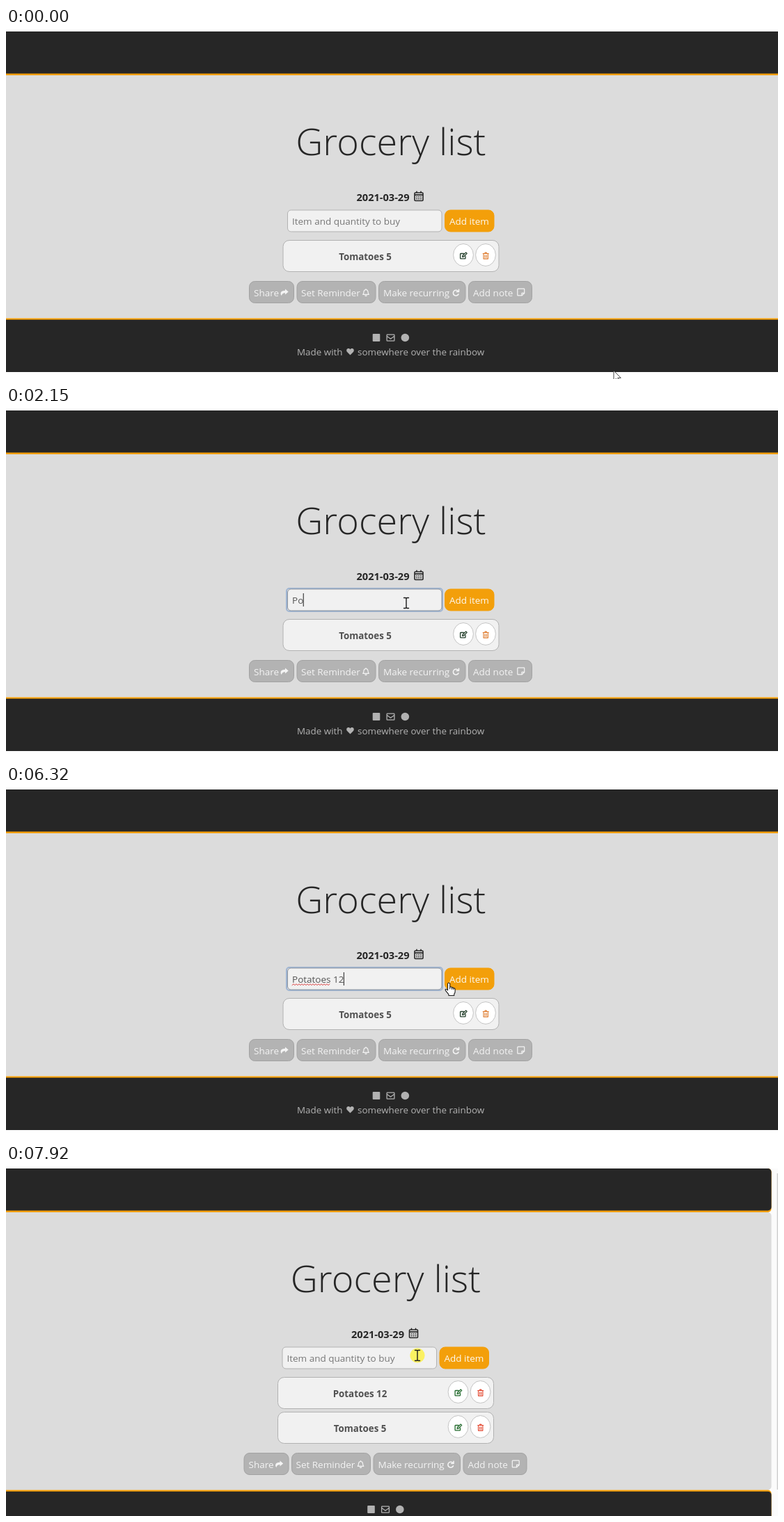
Animation, 1109 px wide and 505 px high, one loop 7.99 s. Source, as an HTML page:

```html
<!DOCTYPE html>
<html lang="en">
<head>
<meta charset="utf-8">
<title>Grocery list</title>
<style>
  html, body { margin: 0; width: 100%; height: 100%; overflow: hidden; background: #fff; }
  svg { display: block; width: 1109px; height: 505px; }
  text { font: 13.5px "Open Sans", "Noto Sans", sans-serif; white-space: pre; }
  .title { font-size: 54px; font-weight: 300; fill: #262626; }
  .date { font-size: 14.6px; font-weight: 700; fill: #262626; }
  .name { font-size: 13.3px; font-weight: 700; fill: #505050; }
  .foot { font-size: 13.4px; fill: #b2b2b2; }
  .line { fill: none; stroke-linecap: round; stroke-linejoin: round; }
</style>
</head>
<body>
<svg id="stage" viewBox="0 0 1109 505" xmlns="http://www.w3.org/2000/svg"></svg>
<script>
const LOOP = 7990, STEP = 70;
const FOCUS = 1030, BLUR = 6940, ADDED = 7080;
const ORANGE = [243, 159, 10], TAN = [227, 205, 165];

// [time, character]
const keys = [
  [1890, 'P'], [2020, 'o'], [2410, 't'], [2540, 'a'], [2940, 't'], [3470, 'o'],
  [3600, 'e'], [3860, 's'], [4720, ' '], [5190, '1'], [5320, '2']
];
// [time, x, y]
const path = [
  [0, 873, 493], [70, 858, 480], [210, 760, 428], [420, 585, 338], [560, 540, 290],
  [700, 575, 282], [6110, 575, 282], [6250, 619, 284], [6320, 643, 283],
  [6530, 653, 287], [6870, 658, 280], [7360, 658, 280], [7490, 646, 282],
  [7630, 618, 283], [7770, 596, 277], [7850, 591, 274], [LOOP, 591, 274]
];
const clicks = [[960, 1160], [6870, ADDED], [7920, LOOP]];

const box = (x, y, w, h, r, fill, stroke = 'none') =>
  `<rect x="${x}" y="${y}" width="${w}" height="${h}" rx="${r}" fill="${fill}" stroke="${stroke}"/>`;
const label = (x, y, s, attrs = '') => `<text x="${x}" y="${y}" ${attrs}>${s}</text>`;
const icon = (x, y, color, d, w = 1.2) =>
  `<path class="line" transform="translate(${x} ${y})" stroke="${color}" stroke-width="${w}" d="${d}"/>`;
const solid = (x, y, fill, d) => `<path transform="translate(${x} ${y})" fill="${fill}" d="${d}"/>`;

const PENCIL = 'M5.5 2H1.2Q.6 2 .6 2.6V8.8Q.6 9.4 1.2 9.4H7.4Q8 9.4 8 8.8V6M3.6 6.8L4 5 8.7.4 10.2 1.9 5.5 6.5Z';
const BIN = 'M.5 2H8.5M3 1.8L3.5.6H5.5L6 1.8M1.3 2.2V9.6H7.7V2.2M3.4 4.2V7.8M5.6 4.2V7.8';

const row = (id, y) => `<g id="${id}">
  ${box(398, y, 310, 45, 9, '#f1f1f1', '#b2b2b2')}
  ${label(516, y + 28, 'Tomatoes 5', 'class="name" text-anchor="middle"')}</g>`;
const tools = (id, y) => `<g id="${id}" fill="#fff" stroke="#c4c4c4">
  <ellipse cx="657" cy="${y}" rx="14.4" ry="16"/><ellipse cx="689" cy="${y}" rx="14.4" ry="16"/>
  ${icon(652, y - 4, 'var(--edit)', PENCIL, 1.3)}${icon(684.7, y - 4, 'var(--bin)', BIN, 1.1)}</g>`;
const action = (x, w, tx, s) =>
  box(x, 364.5, w, 31, 8, '#b3b3b3', '#a2a2a2') + label(tx, 386, s, 'fill="#f4f4f4"');

const stage = document.getElementById('stage');
stage.innerHTML = `
<defs><filter id="blur" x="-100%" y="-200%" width="300%" height="500%"><feGaussianBlur stdDeviation="14"/></filter></defs>
<g id="bar">${box(1099, 5, 10, 500, 0, '#fbfbfb')}${box(1107.5, 12, 1.5, 455, 0, '#cfcfcf')}</g>
<rect class="wide" x="-10" y="5" height="63" fill="#f39f0a"/>
<rect class="wide" x="-10" y="5" height="60.5" fill="#262626"/>
<rect class="wide" id="main" x="-10" y="68" fill="#dcdcdc"/>
<g id="base">
  <rect class="wide" x="-10" y="417.5" height="77.5" fill="#f39f0a"/>
  <rect class="wide" x="-10" y="419.7" height="75.3" fill="#262626"/>
</g>
<g id="page">
  ${label(553, 183, 'Grocery list', 'class="title" text-anchor="middle"')}
  ${label(503.5, 249, '2021-03-29', 'class="date"')}
  ${icon(586, 234.5, '#262626', 'M1 3.5Q1 2.5 2 2.5H12Q13 2.5 13 3.5V13Q13 14 12 14H2Q1 14 1 13ZM1 5.6H13M4 .7V2.5M10 .7V2.5', 1.6)}
  ${icon(586, 234.5, '#262626', 'M3.9 8.4H4.4M6.8 8.4H7.3M9.7 8.4H10.2M3.9 11.2H4.4M6.8 11.2H7.3M9.7 11.2H10.2', 1.5)}
  <g id="ring">${box(403, 261, 224, 33, 4, 'none', '#9fb5d2')}</g>
  <rect id="field" x="404.5" y="262" width="221.5" height="31" rx="5" fill="#f1f1f1"/>
  <text id="typed" x="411" y="283.3"></text>
  <path id="wave" class="line" stroke="#dc3030" stroke-width=".9"/>
  <rect id="caret" y="268" width="1.1" height="19" fill="#333"/>
  ${row('top', 305.5)}${row('extra', 355.5)}
  <rect id="shade" x="630" y="270" width="72" height="32" rx="8" filter="url(#blur)"/>
  <rect id="add" x="630.5" y="262" width="70.5" height="31" rx="8"/>
  ${label(637, 283.3, 'Add item', 'id="addText"')}
  ${tools('topTools', 326.5)}${tools('extraTools', 376.5)}
  <g id="low">
    ${action(349.5, 64, 356, 'Share')}${action(418, 113, 424, 'Set Reminder')}
    ${action(535.5, 124.5, 542, 'Make recurring')}${action(664.5, 91, 671, 'Add note')}
    ${solid(394, 375, '#f4f4f4', 'M7 .5L11.7 4.5 7 8.6V6.2Q2.6 6 1.9 10.2-.2 8 .8 5.4 2.1 2.8 7 2.8Z')}
    ${icon(512, 375, '#f4f4f4', 'M.7 8.3Q2 7 2 4.6 2.2 1.7 5 1.5 7.8 1.7 8 4.6 8 7 9.3 8.3ZM5 .5V1.3M3.9 10Q5 11 6.1 10')}
    ${icon(641, 375.5, '#f4f4f4', 'M8.8 3.6A4 4 0 1 0 9 7.4M9.5 .8V4H6.2', 1.6)}
    ${icon(734, 374.5, '#f4f4f4', 'M1.5.7H10Q10.7.7 10.7 1.4V7L7.2 10.4H1.5Q.8 10.4.8 9.7V1.4Q.8.7 1.5.7ZM10.4 6.8H7V10.2')}
    ${box(526.7, 440, 10.6, 11, 1, '#b2b2b2')}
    ${icon(546.5, 440.5, '#b2b2b2', 'M1.3.7H10.7Q11.4.7 11.4 1.4V9Q11.4 9.7 10.7 9.7H1.3Q.6 9.7.6 9V1.4Q.6.7 1.3.7ZM.8 3L6 6.8 11.2 3', 1.3)}
    <circle cx="573.3" cy="445.5" r="5.8" fill="#b2b2b2"/>
    ${label(418, 470.7, 'Made with', 'class="foot"')}
    ${solid(489, 460.5, '#b2b2b2', 'M5.5 10L1 5.4C-1 3 1-.4 3.6.6 4.7 1 5.1 1.6 5.5 2.1 5.9 1.6 6.3 1 7.4.6 10-.4 12 3 10 5.4Z')}
    ${label(505, 470.7, 'somewhere over the rainbow', 'class="foot"')}
  </g>
</g>
<circle id="glow" r="10.6" fill="#fff01e" fill-opacity=".68"/>
<g id="pointer">
  <path id="arrow" fill="#fff" stroke="#333" stroke-width=".9" d="M0 0V14.5L3.4 11.4 5.6 16.4 8 15.3 5.8 10.4H10.2Z"/>
  <path id="beam" class="line" stroke="#1c1c1c" stroke-width="1.4" d="M-3.5-7.5H-1.2L0-6.9 1.2-7.5H3.5M0-6.9V6.9M-3.5 7.5H-1.2L0 6.9 1.2 7.5H3.5"/>
  <path id="hand" fill="#fff" stroke="#1c1c1c" stroke-width="1.1" stroke-linejoin="round"
    d="M-1.6 1.4Q-1.5 0 0 0T1.6 1.4V6Q3.8 5 4.4 6.8 6.2 6.1 6.8 7.7 9 7.2 9 9.4V12.5Q9 14.6 7.6 16.2V18.2H-.2V16.6L-4.8 10.8Q-5.5 8.8-3.6 8.9L-1.6 10.6ZM1.6 6V9M4.4 6.8V9.4M6.8 7.7V9.7"/>
</g>`;

const el = id => document.getElementById(id);
const show = (id, on) => el(id).setAttribute('visibility', on ? 'visible' : 'hidden');
const set = (node, attrs) => { for (const k in attrs) node.setAttribute(k, attrs[k]); };
const clamp = v => Math.max(0, Math.min(1, v));
const mix = (a, b, k) => `rgb(${a.map((v, i) => Math.round(v + (b[i] - v) * k))})`;

let wave = 'M411 286.6';
for (let x = 413; x <= 465; x += 2) wave += `L${x} ${x % 4 === 1 ? 284.8 : 286.6}`;
el('wave').setAttribute('d', wave);

function pointerAt(t) {
  const i = Math.max(1, path.findIndex(p => p[0] > t));
  const [t0, x0, y0] = path[i - 1], [t1, x1, y1] = path[i];
  const k = (t - t0) / (t1 - t0);
  return [x0 + (x1 - x0) * k, y0 + (y1 - y0) * k];
}

function drawInput(t, added) {
  const focused = t >= FOCUS && t < BLUR;
  const hit = keys.filter(k => k[0] <= t);
  const value = added ? '' : hit.map(k => k[1]).join('');
  const typed = el('typed');
  typed.textContent = value || 'Item and quantity to buy';
  typed.setAttribute('fill', value ? '#555' : '#777');
  show('ring', focused);
  el('ring').setAttribute('stroke-width', 2);
  el('field').setAttribute('stroke', focused ? '#8d949e' : '#b2b2b2');
  show('wave', focused && t >= 4790);
  const since = hit.length ? hit[hit.length - 1][0] : 960;
  show('caret', focused && (t - since) % 1000 < 530);
  if (focused) el('caret').setAttribute('x', 410.4 + (value ? typed.getComputedTextLength() : 0));
}

function drawButton(t) {
  const press = t < 7010 ? 0 : t < ADDED ? 1 : .72 * clamp((7500 - t) / 420);
  set(el('add'), { fill: mix(ORANGE, TAN, press), stroke: mix(ORANGE, [239, 166, 52], press) });
  set(el('addText'), {
    fill: mix([252, 249, 242], [240, 237, 228], press),
    stroke: '#f0ede4', 'stroke-width': .6 * press
  });
  el('shade').setAttribute('opacity', t < 7010 ? 0 : .36 * clamp((7290 - t) / 210));
}

function drawPointer(t) {
  const [x, y] = pointerAt(Math.floor(t / STEP) * STEP);
  const inRow = y > 261 && y < 294;
  const edge = t < ADDED ? 630 : 622.5;
  const kind = !inRow ? 'arrow' : x > edge ? 'hand' : x < edge - 4 ? 'beam' : 'arrow';
  for (const id of ['arrow', 'beam', 'hand']) show(id, id === kind);
  el('pointer').setAttribute('transform', `translate(${x} ${y})`);
  set(el('glow'), { cx: x, cy: y });
  show('glow', clicks.some(([a, b]) => t >= a && t < b));
}

function draw(t) {
  const added = t >= ADDED;
  for (const node of stage.querySelectorAll('.wide'))
    set(node, { width: added ? 1109.5 : 1130, rx: added ? 5 : 0 });
  el('main').setAttribute('height', added ? 399.5 : 349.5);
  for (const id of ['base', 'low']) el(id).setAttribute('transform', `translate(0 ${added ? 50 : 0})`);
  el('page').setAttribute('transform', `translate(${added ? -7.5 : 0} 0)`);
  for (const id of ['bar', 'extra', 'extraTools']) show(id, added);
  el('top').querySelector('text').textContent = added ? 'Potatoes 12' : 'Tomatoes 5';
  stage.style.setProperty('--edit', added ? '#226a2c' : '#24402c');
  stage.style.setProperty('--bin', added ? '#e2432b' : '#df7a2c');
  drawInput(t, added);
  drawButton(t);
  drawPointer(t);
}

const start = performance.now();
function tick() {
  draw((performance.now() - start) % LOOP);
  requestAnimationFrame(tick);
}
tick();
</script>
</body>
</html>
```
